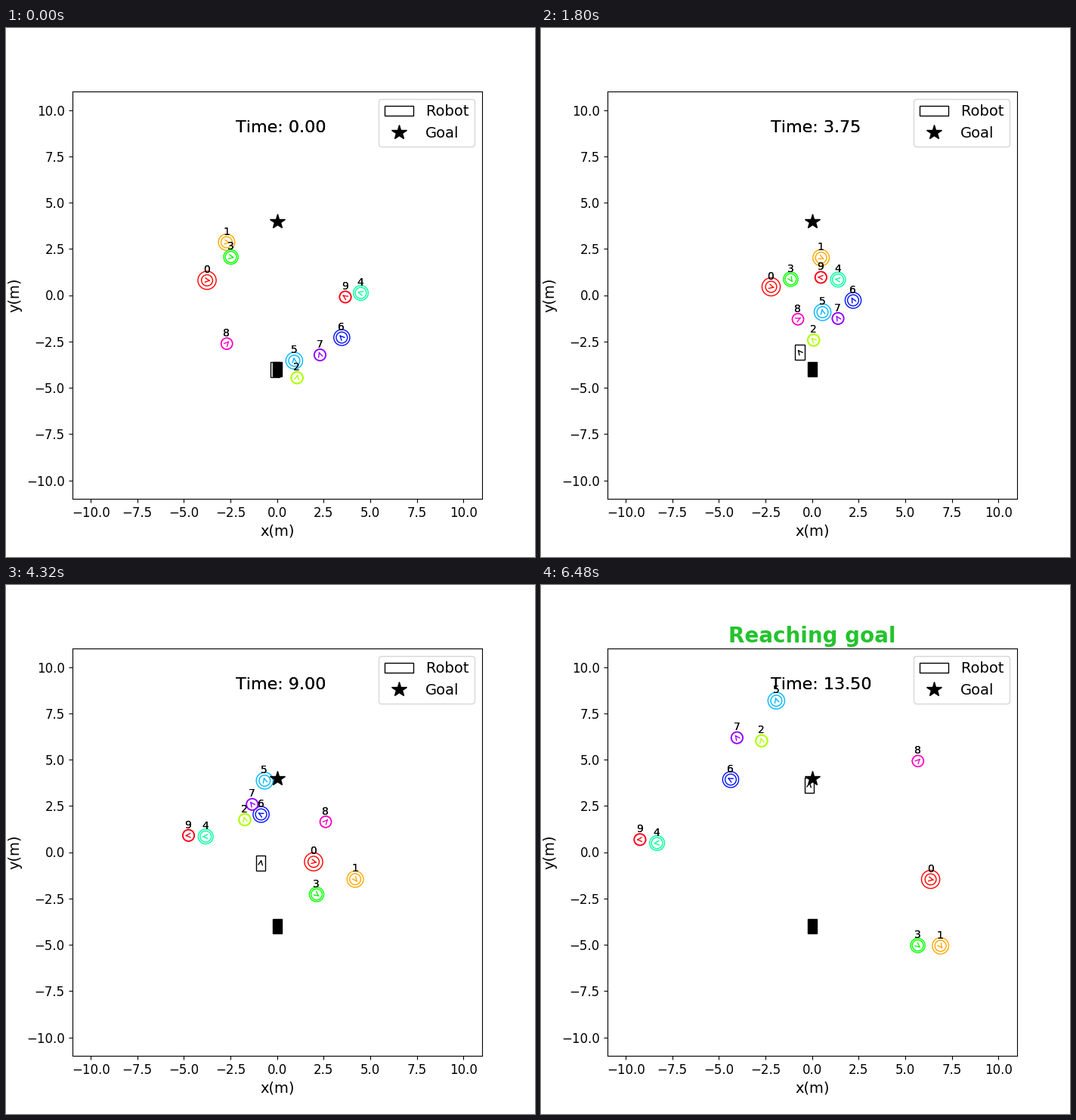
A matplotlib script that plays this animation: 700x700 px, repeating every 6.6 s.

```python
import numpy as np
import matplotlib.pyplot as plt
from matplotlib.animation import FuncAnimation
from matplotlib.patches import ArrowStyle, Circle, FancyArrowPatch, Rectangle

FRAMES, INTERVAL, STEP = 55, 120, 0.25
MID, MEET, END = 15, 28, FRAMES - 1
INNER_RADIUS = 0.3
ROBOT_SIZE = 0.5 + 0.8j
ROBOT_START = -4j
steps = np.arange(FRAMES)

# Positions are complex numbers in metres.
# Each walker: radius, then where it is at the start, MID, MEET and END steps
WALKERS = [
    (0.49, -3.76 + 0.80j, -2.20 + 0.45j, 0.00 - 0.10j, 6.36 - 1.47j),
    (0.44, -2.71 + 2.86j, 0.48 + 2.02j, 2.99 + 0.14j, 6.89 - 5.06j),
    (0.33, 1.07 - 4.46j, 0.08 - 2.43j, -1.30 - 0.14j, -2.71 + 6.01j),
    (0.39, -2.48 + 2.06j, -1.15 + 0.86j, 0.54 - 1.06j, 5.67 - 5.04j),
    (0.40, 4.49 + 0.12j, 1.39 + 0.84j, -1.84 + 1.00j, -8.32 + 0.49j),
    (0.45, 0.92 - 3.54j, 0.56 - 0.92j, -0.11 + 1.94j, -1.92 + 8.18j),
    (0.43, 3.47 - 2.29j, 2.20 - 0.28j, 0.70 + 1.20j, -4.37 + 3.92j),
    (0.32, 2.30 - 3.23j, 1.39 - 1.26j, -0.14 + 0.98j, -4.03 + 6.18j),
    (0.31, -2.70 - 2.62j, -0.76 - 1.30j, 1.24 + 0.18j, 5.68 + 4.92j),
    (0.32, 3.66 - 0.10j, 0.47 + 0.96j, -2.76 + 1.00j, -9.24 + 0.68j),
]

# The robot sidesteps, waits for the crowd, then heads for the goal
ROBOT_STEPS = [0, 9, 15, 21, 28, 36, END]
ROBOT_STOPS = [-0.11 - 4.03j, -0.72 - 3.37j, -0.66 - 3.09j, -0.70 - 3.04j,
               -1.04 - 1.98j, -0.88 - 0.59j, -0.15 + 3.61j]


def walk(start, mid, meet, end):
    """Steady cruise from MEET on, joined smoothly to a cubic before it."""
    cruise = (end - meet) / (END - MEET)
    left = MEET - steps
    spans = np.array([MEET, MEET - MID])
    gap = np.array([start, mid]) - (meet - cruise * spans)
    a, b = np.linalg.solve(np.column_stack([spans**2, spans**3]), gap)
    bend = np.where(left > 0, a * left**2 + b * left**3, 0)
    return meet - cruise * left + bend


def headings(path):
    move = np.diff(path)
    move = np.append(move, move[-1])
    return move / abs(move)


def add_text(*args, **kwargs):
    """Text drawn twice, which gives it a heavier edge."""
    label = ax.text(*args, **kwargs)
    ax.add_artist(label)
    return label


def add_ring(radius, color):
    return ax.add_patch(Circle((0, 0), radius, fill=False, ec=color))


def add_arrow(color):
    style = ArrowStyle("->", head_length=4, head_width=2)
    return ax.add_patch(FancyArrowPatch((0, 0), (1, 0), arrowstyle=style, color=color))


def xy(z):
    return z.real, z.imag


def box(center, **kwargs):
    return ax.add_patch(Rectangle(xy(center - ROBOT_SIZE / 2), *xy(ROBOT_SIZE), **kwargs))


plt.rcParams["font.family"] = "DejaVu Sans"
plt.rcParams["text.kerning_factor"] = 6
fig, ax = plt.subplots(figsize=(7, 7), dpi=100)
ax.set(xlim=(-11, 11), ylim=(-11, 11))
ax.tick_params(labelsize=12)
ax.set_xlabel("x(m)", fontsize=14)
ax.set_ylabel("y(m)", fontsize=14)

robot = box(ROBOT_START, fill=False, ec="black")
box(ROBOT_START, color="black")
goal, = ax.plot([0], [4], "*", color="black", markersize=15)
ax.legend([robot, goal], ["Robot", "Goal"], fontsize=14, loc="upper right")

hues = plt.get_cmap("hsv", len(WALKERS))
crowd = []
for i, (radius, *points) in enumerate(WALKERS):
    path = walk(*points)
    rings = [add_ring(r, hues(i)) for r in (radius, INNER_RADIUS)]
    label = add_text(0, 0, str(i), color="black")
    crowd.append((path, headings(path), rings, add_arrow(hues(i)), label))

robot_path = np.interp(steps, ROBOT_STEPS, ROBOT_STOPS)
robot_heading = headings(robot_path)
robot_arrow = add_arrow("black")
clock = add_text(0.4, 0.9, "", fontsize=16, transform=ax.transAxes)


def aim(arrow, pos, heading):
    arrow.set_positions(xy(pos), xy(pos + INNER_RADIUS * heading))


def update(n):
    for path, heading, rings, arrow, label in crowd:
        pos = path[n]
        for ring in rings:
            ring.center = xy(pos)
        aim(arrow, pos, heading[n])
        label.set_position(xy(pos - 0.2 + 0.4j))

    robot.set_xy(xy(robot_path[n] - ROBOT_SIZE / 2))
    aim(robot_arrow, robot_path[n], robot_heading[n])
    clock.set_text(f"Time: {n * STEP:.2f}")
    ax.set_title("Reaching goal" if n == END else "",
                 fontsize=20, fontweight="bold", color="#24c32e")
    return []


anim = FuncAnimation(fig, update, frames=FRAMES, interval=INTERVAL,
                     repeat=True, repeat_delay=0, blit=False)
plt.show()
```
